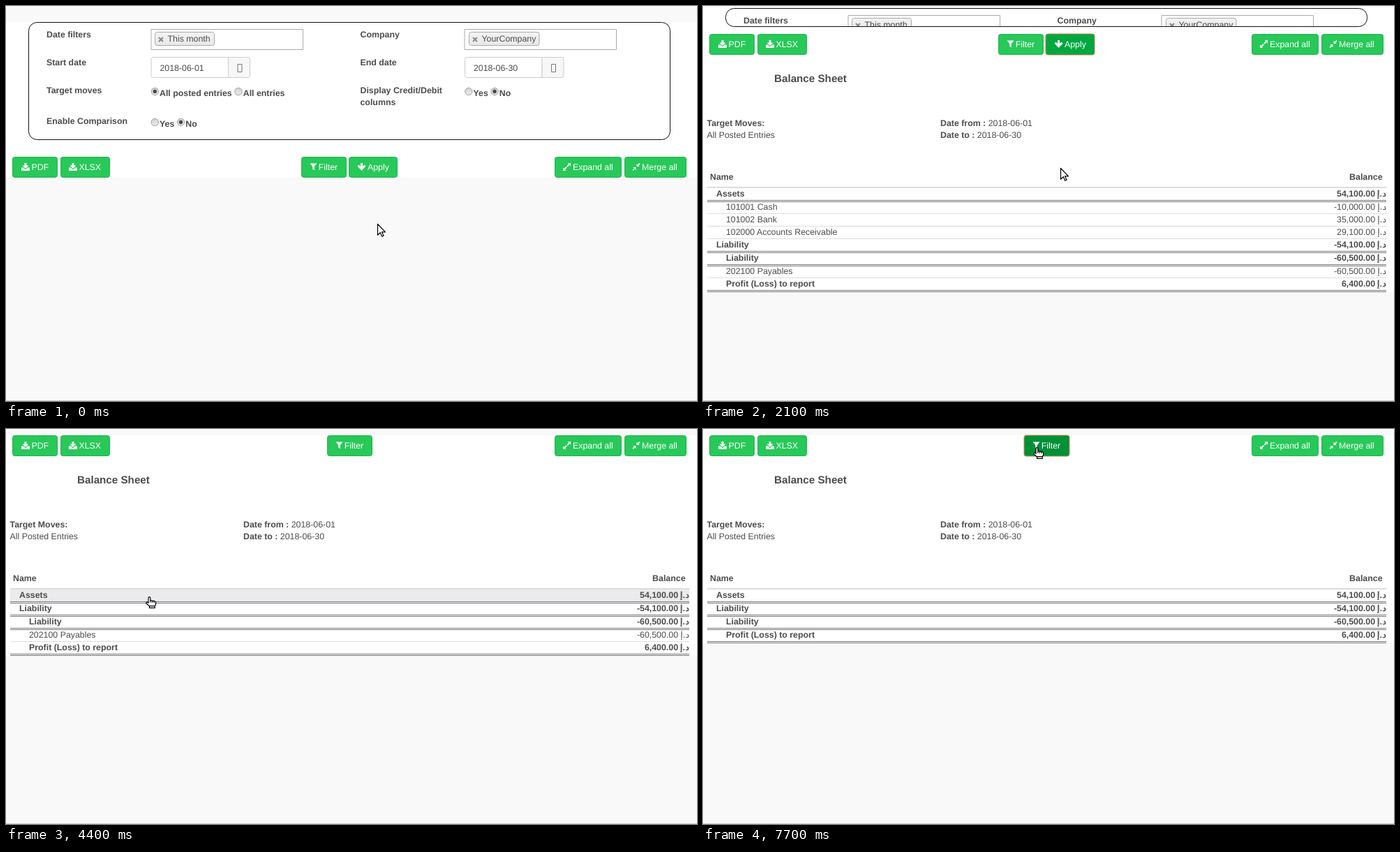
These frames come from a looping animation (990 px wide and 566 px high, 8000 ms). An HTML page with a canvas:

```html
<!DOCTYPE html>
<html lang="en">
<head>
<meta charset="utf-8">
<title>Balance sheet</title>
<style>
html, body { margin: 0; width: 100%; height: 100%; overflow: hidden; background: #f9f9f9; }
canvas { display: block; }
</style>
</head>
<body>
<canvas id="stage" width="990" height="566"></canvas>
<script>
const ctx = document.getElementById('stage').getContext('2d');
const LOOP = 8000, TICK = 100;
const INK = '#4c4c4c', BACK = '#f9f9f9';
const SIZE = 12.36;

const ICONS = {
  download: 'M0 6.5h3l3 3 3-3h3v4.5H0zM4.5 0h3v3.5h3L6 8 1.5 3.5h3z',
  funnel: 'M0 .5h10L6.3 5v5.5L3.7 8.5V5z',
  down: 'M4 0h3v5l2.5-2.5 2 2L5.5 11-.5 4.5l2-2L4 5z',
  expand: 'M6.5 0H11V4.5L9.4 2.9 6.6 5.7 5.3 4.4 8.1 1.6zM4.5 11H0V6.5l1.6 1.6 2.8-2.8 1.3 1.3-2.8 2.8z',
  compress: 'M6 5V.8l1.5 1.5L9.8 0 11 1.2 8.7 3.5 10.2 5zM5 6v4.2L3.5 8.7 1.2 11 0 9.8 2.3 7.5.8 6z'
};
for (const name in ICONS) ICONS[name] = new Path2D(ICONS[name]);

const ARROW = new Path2D('M.5 .5V16.2L4.2 12.7 6.8 18.3 9 17.3 6.5 11.8H11.5z');
const HAND = new Path2D('M4 9.3V1.8Q5.4 -.4 6.8 1.8V5.6L12.8 6.6Q14.6 7 14.6 8.6V11.6L13.2 13.6V16.4H5.6V14L1 10Q.3 7.6 2.6 8.2z');
const HAND_LINES = new Path2D('M6.8 5.6V8.6M9.4 6.2V8.8M12 6.6V9M5.6 13.6H13.2');

const BUTTONS = [
  { label: 'PDF', icon: 'download', x: 9.5, w: 64, ix: 22, tx: 36.5 },
  { label: 'XLSX', icon: 'download', x: 78.5, w: 70, ix: 90, tx: 104.5 },
  { label: 'Filter', icon: 'funnel', x: 423.5, w: 64, ix: 435.5, tx: 447.7 },
  { label: 'Apply', icon: 'down', x: 491.5, w: 69, ix: 504, tx: 518 },
  { label: 'Expand all', icon: 'expand', x: 786.5, w: 95, ix: 798, tx: 812 },
  { label: 'Merge all', icon: 'compress', x: 886.5, w: 88, ix: 897.5, tx: 911 }
];

const ROWS = [
  { name: 'Assets', sum: '54,100.00', x: 19, bold: true },
  { name: '101001 Cash', sum: '-10,000.00', x: 33, until: 4400 },
  { name: '101002 Bank', sum: '35,000.00', x: 33, until: 4400 },
  { name: '102000 Accounts Receivable', sum: '29,100.00', x: 33, until: 4400 },
  { name: 'Liability', sum: '-54,100.00', x: 19, bold: true },
  { name: 'Liability', sum: '-60,500.00', x: 33, bold: true },
  { name: '202100 Payables', sum: '-60,500.00', x: 33, until: 6000 },
  { name: 'Profit (Loss) to report', sum: '6,400.00', x: 33, bold: true }
];

// [time, x, y, hand] of the pointer's hot spot
const POINTER = [
  [1000, 517, 231, 1], [1300, 513, 231, 1], [1800, 512, 232, 0], [2400, 512, 231, 1],
  [2900, 290, 250, 1], [3000, 208, 245, 1], [3200, 206, 240, 1], [3800, 205, 240, 1],
  [4800, 204, 262, 1], [4900, 205, 282, 1], [5500, 203, 282, 1], [6600, 330, 190, 0],
  [6700, 459, 100, 0], [7100, 477, 41, 0], [7300, 477, 36, 1], [7400, 477, 31, 1],
  [7500, 478, 26, 1]
];

// Share of the filter panel still open, per tick from SLIDE_START
const SLIDE = [.98, .85, .67, .39, .15, .015];
const SLIDE_START = 1700, SLIDE_END = 2300, TABLE_START = 1900;

function text(str, x, y, { bold, color = INK, size = SIZE, align = 'left', family = '"Liberation Sans", Arial' } = {}) {
  ctx.font = `${bold ? 'bold ' : ''}${size}px ${family}, sans-serif`;
  ctx.fillStyle = color;
  ctx.textAlign = align;
  ctx.fillText(str, x, Math.round(y));
  return ctx.measureText(str).width;
}

function box(x, y, w, h, radius, fill, stroke) {
  ctx.beginPath();
  ctx.roundRect(x, y, w, h, radius);
  if (fill) { ctx.fillStyle = fill; ctx.fill(); }
  if (stroke) { ctx.strokeStyle = stroke; ctx.lineWidth = 1; ctx.stroke(); }
}

function bar(x, y, w, h, color) {
  ctx.fillStyle = color;
  ctx.fillRect(x, y, w, h);
}

function pointerAt(t) {
  if (t < 1000) {
    const u = Math.min(1, Math.max(0, (t - 300) / 700));
    const e = u * u * (3 - 2 * u);
    const y = Math.round(312 - 81 * e);
    return { x: Math.round(532 - 15 * e), y, hand: y < 246 };
  }
  const [, x, y, hand] = POINTER.filter(k => k[0] <= t).pop();
  return { x, y, hand };
}

function openShare(t) {
  if (t < SLIDE_START) return 1;
  return t < SLIDE_END ? SLIDE[(t - SLIDE_START) / TICK] : 0;
}

function tag(x, y, w, label) {
  const g = ctx.createLinearGradient(0, y, 0, y + 19);
  g.addColorStop(0, '#f3f3f3');
  g.addColorStop(1, '#e8e8e8');
  box(x, y, w, 19, 3, g, '#aaa');
  ctx.beginPath();
  ctx.moveTo(x + 5.5, y + 7.5); ctx.lineTo(x + 11.5, y + 13.5);
  ctx.moveTo(x + 11.5, y + 7.5); ctx.lineTo(x + 5.5, y + 13.5);
  ctx.strokeStyle = '#888';
  ctx.lineWidth = 2;
  ctx.stroke();
  text(label, x + 18, y + 13.5);
}

function dateField(x, value, dy, exact) {
  const y = 73.5 + dy;
  box(x, y, 110.5, 29, [3, 0, 0, 3], '#fff', '#ccc');
  box(x + 110.5, y, 31, 29, [0, 3, 3, 0], '#f7f7f7', '#ccc');
  box(x + 124, y + 10, 6, 11, 0, null, '#777');
  text(value, x + 12.5, 92.6 + exact);
}

function radio(x, y, label, checked) {
  const g = ctx.createLinearGradient(0, y - 5, 0, y + 5);
  g.addColorStop(0, '#d2d2d2');
  g.addColorStop(1, '#ececec');
  ctx.beginPath();
  ctx.arc(x, y, 5.2, 0, 7);
  ctx.fillStyle = g;
  ctx.fill();
  ctx.strokeStyle = '#a0a0a0';
  ctx.lineWidth = 1;
  ctx.stroke();
  if (checked) {
    ctx.beginPath();
    ctx.arc(x, y, 2.7, 0, 7);
    ctx.fillStyle = '#484848';
    ctx.fill();
  }
  text(label, x + 6.7, y + 6.5, { bold: true });
}

function filterPanel(share) {
  const exact = 23 * share - 23, dy = Math.round(exact);
  const top = 23 + dy, height = Math.round(2 + 167 * share);
  const label = (str, x, y) => text(str, x, y + dy, { bold: true });
  ctx.save();
  ctx.beginPath();
  ctx.rect(32, top, 920, height);
  ctx.clip();
  label('Date filters', 58, 45);
  label('Start date', 58, 85);
  label('Target moves', 58, 125);
  label('Enable Comparison', 58, 169);
  label('Company', 507.5, 45);
  label('End date', 507.5, 85);
  label('Display Credit/Debit', 507.5, 125);
  label('columns', 507.5, 142);
  for (const x of [208.5, 657.5]) box(x - .5, 33.5 + dy, 217.5, 29, 0, '#fff', '#aaa');
  tag(213.5, 37.5 + dy, 85, 'This month');
  tag(663.5, 37.5 + dy, 100.5, 'YourCompany');
  dateField(208, '2018-06-01', dy, exact);
  dateField(657.5, '2018-06-30', dy, exact);
  radio(213.3, 122.5 + dy, 'All posted entries', true);
  radio(333, 122.5 + dy, 'All entries');
  radio(662.8, 122.5 + dy, 'Yes');
  radio(700, 122.5 + dy, 'No', true);
  radio(213.3, 166.5 + dy, 'Yes');
  radio(250.5, 166.5 + dy, 'No', true);
  ctx.restore();
  box(32.5, top + .5, 919, Math.max(1, height - 1), Math.min(12, height / 2), null, '#111');
}

function button(b, shift, top, state) {
  const fill = { idle: '#28c859', hover: '#00a83f', focus: '#00a83f', pressed: '#009036' }[state];
  const x = b.x + shift, focused = state === 'focus' || state === 'pressed';
  box(x, top + .5, b.w, 29, 3, fill, state === 'idle' ? '#1fb44c' : '#009638');
  if (focused) box(x - .5, top, b.w + 1, 30, 3, null, '#c9874c');
  ctx.save();
  ctx.translate(b.ix + shift, top + 9);
  ctx.fillStyle = '#fff';
  ctx.fill(ICONS[b.icon]);
  ctx.restore();
  text(b.label, b.tx + shift, top + 19, { color: '#fff' });
}

function toolbar(t, top, pointer) {
  const closed = t >= SLIDE_END;
  for (const b of BUTTONS) {
    if (closed && b.label === 'Apply') continue;
    const shift = closed && b.label === 'Filter' ? 37 : 0;
    const dx = pointer.x - b.x - shift;
    let state = dx >= 0 && dx <= b.w && pointer.y >= top && pointer.y < top + 30 ? 'hover' : 'idle';
    if (b.label === 'Apply' && t >= 1500) state = t < 1600 ? 'pressed' : 'focus';
    if (b.label === 'Filter' && t >= 7700) state = 'pressed';
    button(b, shift, top, state);
  }
}

function pair(label, value, x, y) {
  const w = text(label, x, y, { bold: true });
  text(value, x + w, y);
}

// The regular face is struck twice for bold, which keeps it narrow
function currency(y, bold) {
  const style = { align: 'right', family: '"DejaVu Sans"' };
  text('د.إ', 979, y, style);
  if (bold) text('د.إ', 978.4, y, style);
}

function report(t, top, pointer) {
  text('Balance Sheet', 102, top + 69, { bold: true, size: 15.2 });
  text('Target Moves:', 5.5, top + 132, { bold: true });
  text('All Posted Entries', 5.5, top + 149);
  pair('Date from : ', '2018-06-01', 340, top + 132);
  pair('Date to : ', '2018-06-30', 340, top + 149);
  text('Name', 10, top + 209, { bold: true });
  text('Balance', 973.5, top + 209, { bold: true, align: 'right' });

  let y = top + 220;
  bar(6, y - 1, 973, 2, '#ddd');
  for (const { name, sum, x, bold, until = Infinity } of ROWS) {
    if (t >= until) continue;
    const h = bold ? 19 : 18;
    if (pointer.y >= y && pointer.y < y + h) bar(6, y + 1, 973, h - 1, '#ebebed');
    text(name, x, y + 13, { bold });
    text(sum, 963, y + 13, { bold, align: 'right' });
    currency(y + 13, bold);
    y += h;
    if (bold) {
      bar(6, y - 1, 973, 1, '#777');
      bar(6, y, 973, 1, '#fff');
      bar(6, y + 1, 973, 1, '#777');
    } else {
      bar(6, y, 973, 1, '#ddd');
    }
  }
}

function drawPointer({ x, y, hand }) {
  ctx.save();
  ctx.translate(hand ? x - 5 : x, y);
  ctx.lineJoin = 'round';
  ctx.lineWidth = 1.2;
  ctx.fillStyle = '#fff';
  ctx.strokeStyle = '#000';
  const shape = hand ? HAND : ARROW;
  ctx.fill(shape);
  ctx.stroke(shape);
  if (hand) ctx.stroke(HAND_LINES);
  ctx.restore();
}

function draw(t) {
  const share = openShare(t), pointer = pointerAt(t);
  const panelTop = share ? Math.round(23 * share) : 9;
  const top = share ? Math.round(190 * share + 2 + Math.max(9.5, 24 * share)) : 9;
  const hasTable = t >= TABLE_START;
  const rowsHeight = ROWS.reduce((sum, r) => sum + (t >= r.until ? 0 : r.bold ? 19 : 18), 0);
  const bottom = hasTable ? top + 222 + rowsHeight : top + 30;

  ctx.textRendering = 'geometricPrecision';
  bar(0, 0, 990, 566, BACK);
  bar(0, panelTop, 990, bottom - panelTop, '#fff');
  bar(0, 565, 990, 1, '#ccc');
  if (share) filterPanel(share);
  if (hasTable) report(t, top, pointer);
  toolbar(t, top, pointer);
  drawPointer(pointer);
}

const start = performance.now();
function frame() {
  const t = (performance.now() - start) % LOOP;
  draw(Math.floor(t / TICK) * TICK);
  requestAnimationFrame(frame);
}
frame();
</script>
</body>
</html>
```
